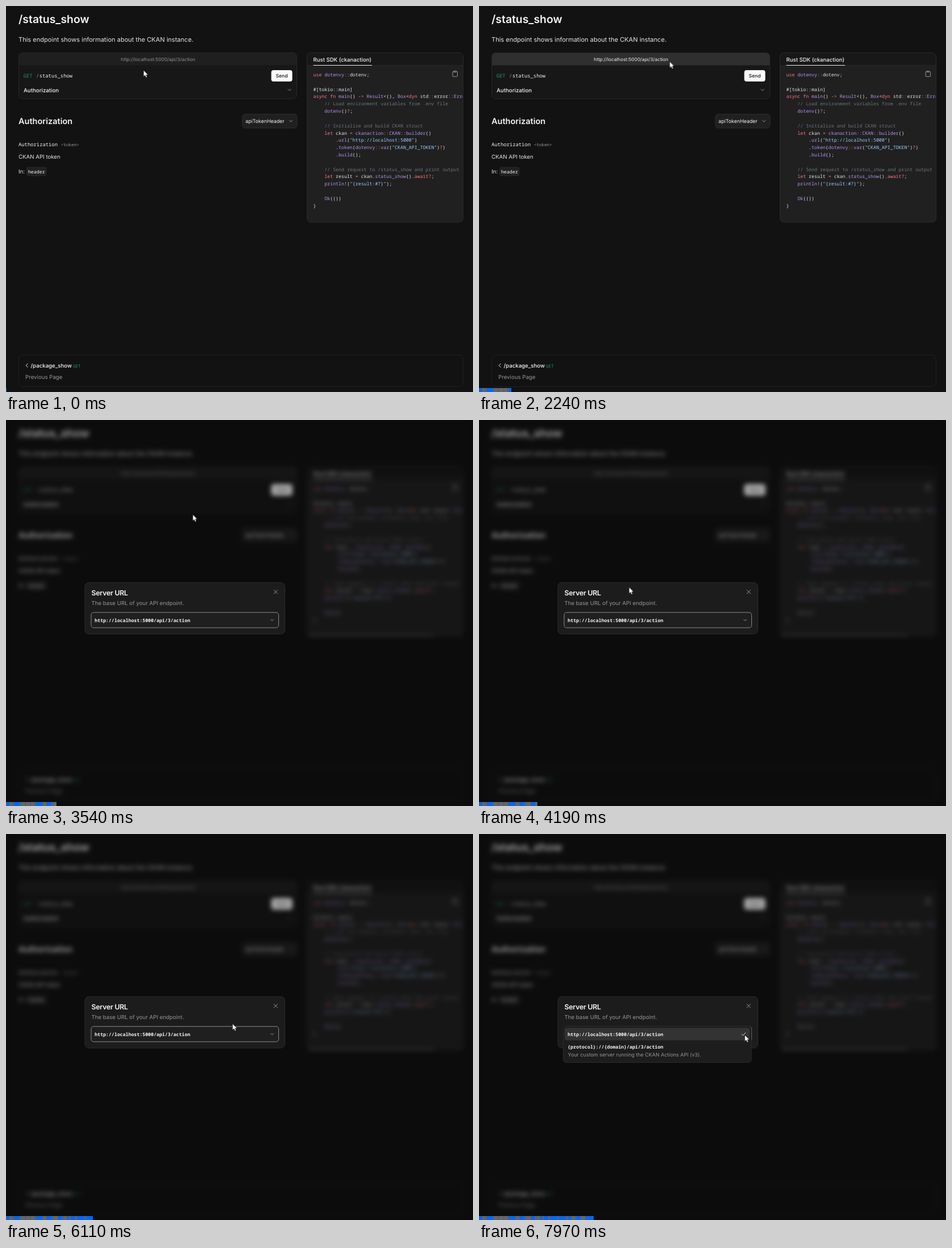
An HTML page that plays this animation: 823x680 px, repeating every 7990 ms.

```html
<!DOCTYPE html>
<html lang="en">
<head>
<meta charset="utf-8">
<title>/status_show</title>
<style>
html, body { margin: 0; width: 100%; height: 100%; overflow: hidden; background: #121212; }
#stage { position: relative; width: 823px; height: 680px; overflow: hidden; background: #121212; }
#stage > * { position: absolute; left: 0; top: 0; }
svg { display: block; overflow: visible; }
text, pre { font-family: Inter, sans-serif; font-optical-sizing: none; text-rendering: geometricPrecision; }
text { fill: #f5f5f5; font-size: 9.69px; white-space: pre; }
.mono, pre { font-family: "Noto Sans Mono", "DejaVu Sans Mono", monospace; font-weight: 500; }
.m14 { font-size: 8.86px; }
.m13 { font-size: 8.25px; }
.m12 { font-size: 7.6px; }
.medium { font-weight: 500; }
.semi { font-weight: 600; }
.muted { fill: #969696; }
.get { fill: #28907c; }
.mid { text-anchor: middle; }
.icon { fill: none; stroke: #a3a3a3; stroke-width: .9; stroke-linecap: round; stroke-linejoin: round; }
.bright { stroke: #f2f2f2; }

pre { margin: 0; width: 263.5px; height: 260px; overflow: hidden; color: #e1e4e8; font-size: 8.25px; line-height: 12.806px; }
#stage > pre { left: 541.5px; top: 116px; }
.k { color: #f97583; }
.f { color: #b392f0; }
.s { color: #9ecbff; }
.c { color: #6a737d; }

#scrim { width: 823px; height: 680px; background: rgba(0, 0, 0, .3); backdrop-filter: blur(4px); }
#stage > #bar { top: 673px; height: 7px; overflow: hidden; }

#urlBar, #urlText, #trigger, #scrollbar, #scrim, #dialog, #menu, #bar, #cursor {
  animation: 7990ms linear infinite;
}
#urlBar { animation-name: url-bar; }
#urlText { animation-name: url-text; }
#trigger { animation-name: trigger; }
#scrollbar { animation-name: scrollbar; }
#scrim { animation-name: scrim; }
#dialog { animation-name: dialog; transform-origin: 315.3px 331.7px; }
#menu { animation-name: menu; transform-origin: 314px 338px; }
#bar { animation-name: bar; }
#cursor { animation-name: cursor; }

@keyframes url-bar { 0%, 7.5%, 32.5%, 100% { fill: #1f1f1f; } 9.4%, 30.7% { fill: #2f2f2f; } }
@keyframes url-text { 0%, 7.5%, 32.5%, 100% { fill: #929292; } 9.4%, 30.7% { fill: #f0f0f0; } }
@keyframes trigger { 0%, 81.6% { fill: #1f1f1f; } 83.5%, 100% { fill: #2e2e2e; } }
@keyframes scrollbar { 0%, 30.72% { opacity: 0; } 30.73%, 100% { opacity: 1; } }
@keyframes scrim {
  0% { opacity: 0; }
  30.73% { opacity: 0; animation-timing-function: ease; }
  34.48%, 100% { opacity: 1; }
}
@keyframes dialog {
  0% { opacity: 0; transform: scale(1.06); }
  30.73% { opacity: 0; transform: scale(1.06); animation-timing-function: cubic-bezier(.16, 1, .3, 1); }
  34.48%, 100% { opacity: 1; transform: none; }
}
@keyframes menu {
  0% { opacity: 0; transform: scale(.95); }
  92.6% { opacity: 0; transform: scale(.95); animation-timing-function: ease; }
  94.5%, 100% { opacity: 1; transform: none; }
}
@keyframes bar {
  0% { width: 1px; }
  10.4% { width: 20px; }
  16% { width: 31.5px; }
  20.5% { width: 41px; }
  32% { width: 66px; }
  44.3% { width: 89px; }
  51.1% { width: 101px; }
  62.1% { width: 121px; }
  76.5% { width: 153px; }
  100% { width: 202px; }
}
@keyframes cursor {
  0% { transform: translate(242px, 113px); }
  7.5% { transform: translate(250px, 103px); }
  11.3% { transform: translate(254px, 98px); }
  16% { transform: translate(256px, 99px); }
  20.3% { transform: translate(307px, 97px); }
  25% { transform: translate(332px, 94px); }
  30% { transform: translate(338px, 100px); }
  32% { transform: translate(339px, 101px); }
  40.7% { transform: translate(337px, 109px); }
  44.3% { transform: translate(329px, 166px); }
  49.8% { transform: translate(266px, 282px); }
  52.6% { transform: translate(264px, 295px); }
  60.8% { transform: translate(266px, 306px); }
  62.1% { transform: translate(281px, 305px); }
  70.5% { transform: translate(327px, 325px); }
  71.7% { transform: translate(331px, 328px); }
  76.5% { transform: translate(399px, 334px); }
  81.5% { transform: translate(452px, 337px); }
  85.1% { transform: translate(464px, 350px); }
  90.1%, 100% { transform: translate(468px, 354px); }
}
</style>
</head>
<body>
<div id="stage">
  <svg width="823" height="680">
    <text class="semi" x="22" y="30" style="font-size:19.38px">/status_show</text>
    <text x="22" y="62.7" style="font-size:11.07px;fill:#e6e6e6">This endpoint shows information about the CKAN instance.</text>

    <!-- Request card -->
    <rect x="22.5" y="82.5" width="490" height="81" rx="7" fill="#171717"/>
    <path id="urlBar" d="M22.5 104.5V89.5a7 7 0 0 1 7-7h476a7 7 0 0 1 7 7v15z"/>
    <rect x="22.5" y="82.5" width="490" height="81" rx="7" fill="none" stroke="#272727"/>
    <text id="urlText" class="mid" x="268" y="97.3" style="font-size:8.25px">http://localhost:5000/api/3/action</text>
    <text class="mono m14 get" x="30.7" y="126.2">GET</text>
    <text class="mono m14 muted" x="53" y="126.2">/</text>
    <text class="mono m14" x="58.7" y="126.2">status_show</text>
    <rect x="467.5" y="113" width="37" height="20" rx="4" fill="#fafafa"/>
    <text class="mid medium" x="486" y="126.2" style="font-size:8.5px;fill:#151515">Send</text>
    <text class="medium" x="31" y="151.5">Authorization</text>
    <path class="icon" d="M497 146.5l2.6 2.6 2.6-2.6"/>

    <!-- Authorization section -->
    <text class="semi" x="22" y="207.6" style="font-size:14.53px">Authorization</text>
    <rect x="416.5" y="190.5" width="96.5" height="24.5" rx="5" fill="#202020" stroke="#2c2c2c"/>
    <text x="422" y="206" style="font-size:8.85px">apiTokenHeader</text>
    <path class="icon" d="M499.5 201.5l2.6 2.6 2.6-2.6"/>
    <text class="mono m14" x="22" y="247.4">Authorization</text>
    <text class="mono m12 muted" x="96.7" y="247.4">&lt;token&gt;</text>
    <text x="22" y="269" style="fill:#e6e6e6">CKAN API token</text>
    <text x="22" y="294.6" style="fill:#e6e6e6">In:</text>
    <rect x="36.5" y="284" width="34.5" height="15" rx="3" fill="#202020" stroke="#2c2c2c" stroke-width=".8"/>
    <text class="mono m13" x="38.9" y="294.6">header</text>

    <!-- Code panel -->
    <rect x="530.5" y="82.5" width="275" height="298.5" rx="7" fill="#202020"/>
    <path d="M530.5 104.5V89.5a7 7 0 0 1 7-7h261a7 7 0 0 1 7 7v15z" fill="#181818"/>
    <path d="M531 104.5h274" stroke="#272727"/>
    <rect x="530.5" y="82.5" width="275" height="298.5" rx="7" fill="none" stroke="#2b2b2b"/>
    <text class="medium" x="541.5" y="98" style="font-size:9.6px">Rust SDK (ckanaction)</text>
    <path d="M541.5 104.5h103.5" stroke="#eee"/>
    <path class="icon" d="M789.5 115.5h-1.3a1 1 0 0 0-1 1v6.8a1 1 0 0 0 1 1h6.3a1 1 0 0 0 1-1v-6.8a1 1 0 0 0-1-1h-1.2M789.5 114.5h3.8v2h-3.8z"/>
    <rect id="scrollbar" x="533" y="378" width="221" height="2" rx="1" fill="#555"/>

    <!-- Previous page card -->
    <rect x="22.5" y="615" width="783" height="55.5" rx="7" fill="none" stroke="#212121"/>
    <path class="icon bright" d="M38.2 630l-3 3.2 3 3.2"/>
    <text class="medium" x="43.5" y="637.2">/package_show</text>
    <text class="mono get" x="118" y="637.2" style="font-size:7.5px">GET</text>
    <text class="muted" x="34" y="656.5">Previous Page</text>
  </svg>

<pre><span class="k">use</span> <span class="f">dotenvy</span><span class="k">::</span>dotenv;

#[tokio::main]
<span class="k">async fn</span> <span class="f">main</span>() <span class="k">-&gt;</span> <span class="f">Result</span>&lt;(), <span class="f">Box</span>&lt;<span class="k">dyn</span> std<span class="k">::</span>error<span class="k">::</span><span class="f">Error</span>&gt;&gt; {
    <span class="c">// Load environment variables from .env file</span>
    <span class="f">dotenv</span>()<span class="k">?</span>;

    <span class="c">// Initialize and build CKAN struct</span>
    <span class="k">let</span> ckan <span class="k">=</span> <span class="f">ckanaction</span><span class="k">::</span><span class="f">CKAN</span><span class="k">::</span><span class="f">builder</span>()
        .<span class="f">url</span>(<span class="s">"http://localhost:5000"</span>)
        .<span class="f">token</span>(<span class="f">dotenvy</span><span class="k">::</span><span class="f">var</span>(<span class="s">"CKAN_API_TOKEN"</span>)<span class="k">?</span>)
        .<span class="f">build</span>();

    <span class="c">// Send request to /status_show and print output</span>
    <span class="k">let</span> result <span class="k">=</span> ckan.<span class="f">status_show</span>().<span class="k">await?</span>;
    <span class="f">println!</span>(<span class="s">"{result:#?}"</span>);

    <span class="f">Ok</span>(())
}</pre>

  <div id="scrim"></div>

  <svg id="dialog" width="823" height="680">
    <rect x="139" y="286.5" width="352.5" height="90.5" rx="7" fill="#1c1c1c" stroke="#2a2a2a"/>
    <text class="semi" x="150.5" y="308.8" style="font-size:12.45px;letter-spacing:-.025em">Server URL</text>
    <text class="muted" x="150.5" y="325.6">The base URL of your API endpoint.</text>
    <path class="icon" d="M472 299.5l6.5 6.5m0-6.5l-6.5 6.5"/>
    <rect id="trigger" x="150" y="339" width="330.5" height="27" rx="4.5" stroke="#8c8c8c"/>
    <text class="mono m13 semi" x="156.3" y="355.8">http://localhost:5000/api/3/action</text>
    <path class="icon" d="M466.5 351.2l2.6 2.6 2.6-2.6"/>
  </svg>

  <svg id="menu" width="823" height="680">
    <rect x="148.5" y="338.5" width="331.5" height="64" rx="5" fill="#1d1d1d" stroke="#2b2b2b"/>
    <rect x="151" y="341.5" width="326" height="22" rx="4" fill="#333"/>
    <text class="mono m13 semi" x="156.3" y="355.8">http://localhost:5000/api/3/action</text>
    <path class="icon bright" d="M463 352.7l2.2 2.2 4.5-4.8"/>
    <text class="mono m13 semi" x="156.3" y="378">{protocol}://{domain}/api/3/action</text>
    <text class="muted" x="156.5" y="391.5" style="font-size:8.97px">Your custom server running the CKAN Actions API (v3).</text>
  </svg>

  <div id="bar"><svg id="stripes" width="203" height="7"></svg></div>

  <svg id="cursor" width="10" height="14">
    <path d="M.4 .2V11.2l2.5-2.3 1.8 4 1.9-.8-1.8-3.9h3.5z" fill="#fff" stroke="#000" stroke-width=".5"/>
  </svg>
</div>

<script>
// Recording bar: alternating blocks with thin darker seams.
const edges = [0, 5, 13, 24, 52, 64, 71, 80, 92, 98, 108, 111, 114, 121, 125, 138, 141, 153, 157, 163, 171, 179, 187, 203];
const rect = (x, width, fill) => `<rect x="${x}" width="${width}" height="7" fill="${fill}"/>`;
const blocks = edges.slice(1).map((end, i) => rect(edges[i], end - edges[i], i % 2 ? '#666' : '#0066ff'));
const seams = [];
for (let x = 2, i = 0; x < 200; x += 3 + (i * i * 7 + i * 3) % 8, i++) seams.push(rect(x, 1, '#2f5f9e'));
document.getElementById('stripes').innerHTML = blocks.concat(seams).join('');
</script>
</body>
</html>
```
